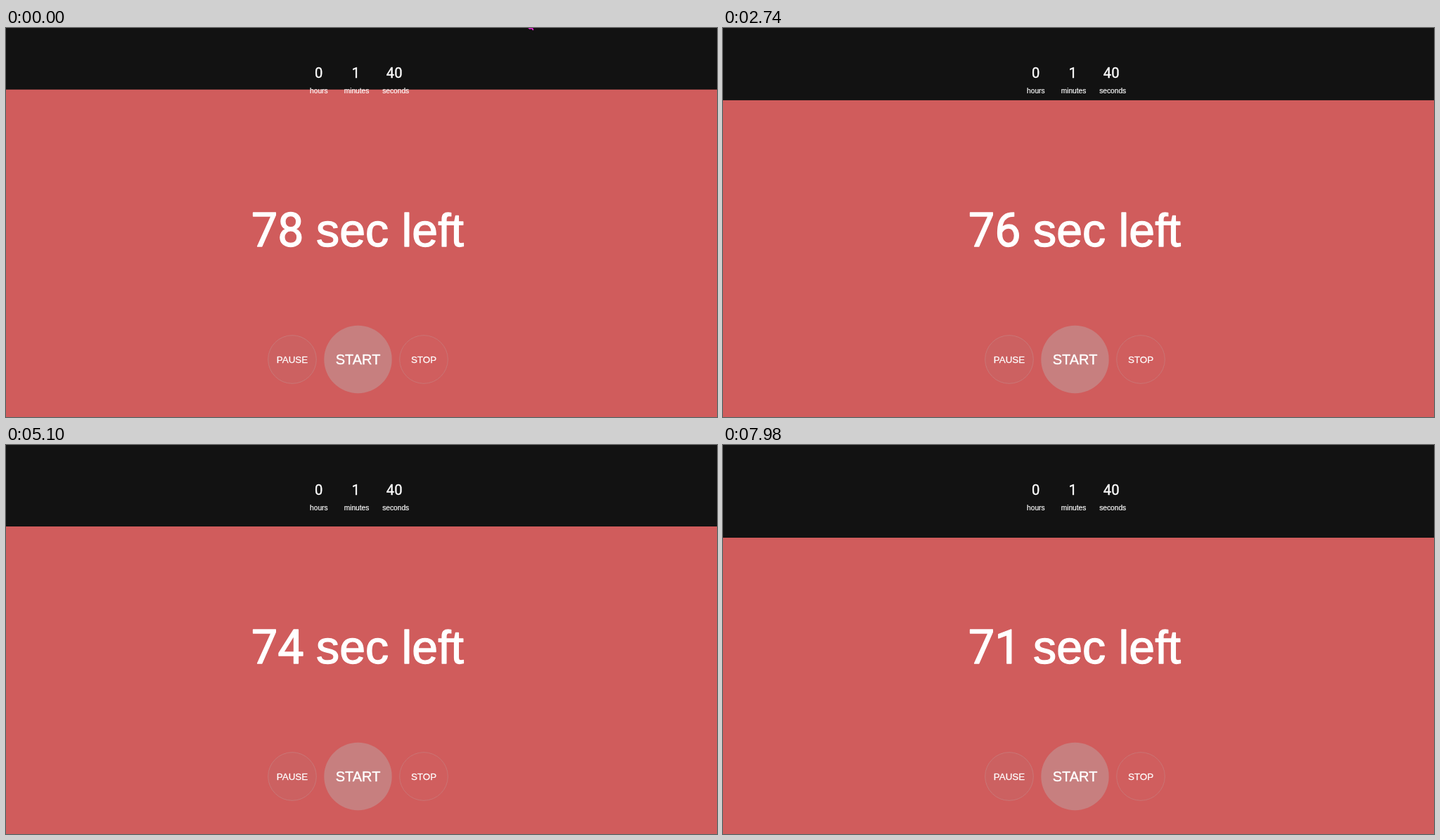
These frames come from a looping animation (1011x554 px, 8000 ms). An HTML page with a canvas:

```html
<!DOCTYPE html>
<html lang="en">
<head>
<meta charset="utf-8">
<title>Countdown</title>
<style>
  html, body { margin: 0; width: 100%; height: 100%; overflow: hidden; background: #d05c5c; }
  canvas { display: block; }
</style>
</head>
<body>
<canvas width="1011" height="554"></canvas>
<script>
const LOOP = 8000;
const LETTERS = '"Liberation Sans", Arial, sans-serif';
const DIGITS = 'Roboto, sans-serif'; // its 1 has no foot
const ctx = document.querySelector('canvas').getContext('2d');

function text(str, x, baseline, size, font = LETTERS, align = 'center') {
  ctx.font = `${size}px ${font}`;
  ctx.textAlign = align;
  ctx.fillStyle = ctx.strokeStyle = '#fff';
  ctx.lineWidth = size * 0.02; // slightly heavier than regular
  ctx.lineJoin = 'round';
  ctx.fillText(str, x, baseline);
  ctx.strokeText(str, x, baseline);
}

function button(label, x, r, size, baseline, fill, stroke) {
  ctx.beginPath();
  ctx.arc(x, 472, r, 0, 2 * Math.PI);
  ctx.fillStyle = fill;
  ctx.fill();
  if (stroke) {
    ctx.strokeStyle = stroke;
    ctx.lineWidth = 1;
    ctx.stroke();
  }
  text(label, x, baseline, size);
}

function unit(value, valueX, label, labelX) {
  text(value, valueX, 70.5, 20.2, DIGITS);
  text(label, labelX, 93, 10.2);
}

// Tip of a pointer leaving through the top edge
function pointer() {
  ctx.beginPath();
  ctx.moveTo(742, 0);
  ctx.lineTo(745, 2);
  ctx.lineTo(747, 1);
  ctx.lineTo(749, 3.5);
  ctx.lineTo(750.5, 2.5);
  ctx.lineTo(749, 0);
  ctx.fillStyle = '#e22bd0';
  ctx.fill();
}

function draw(t) {
  ctx.fillStyle = '#d05c5c';
  ctx.fillRect(0, 0, 1011, 554);
  ctx.fillStyle = '#121212';
  ctx.fillRect(0, 0, 1011, 87.65 + t * 0.00556);
  if (t < 20) pointer();

  unit('0', 444.7, 'hours', 444.8);
  unit('1', 497.3, 'minutes', 498.5);
  unit('40', 552.2, 'seconds', 554.2);

  const left = 78 - Math.max(0, Math.floor((t - 240) / 1000));
  text(left, 349, 310.5, 66.3, DIGITS, 'left');
  text('sec left', 441, 310.5, 66.3, LETTERS, 'left');

  button('PAUSE', 407, 34.3, 13.4, 476.5, '#cc6161', '#c97777');
  button('START', 500.5, 48.2, 20, 479, '#c77f7f');
  button('STOP', 594, 34.3, 13.4, 476.5, '#d05e5e', '#ca7474');
}

function frame() {
  draw(performance.now() % LOOP);
  requestAnimationFrame(frame);
}
frame();
</script>
</body>
</html>
```
